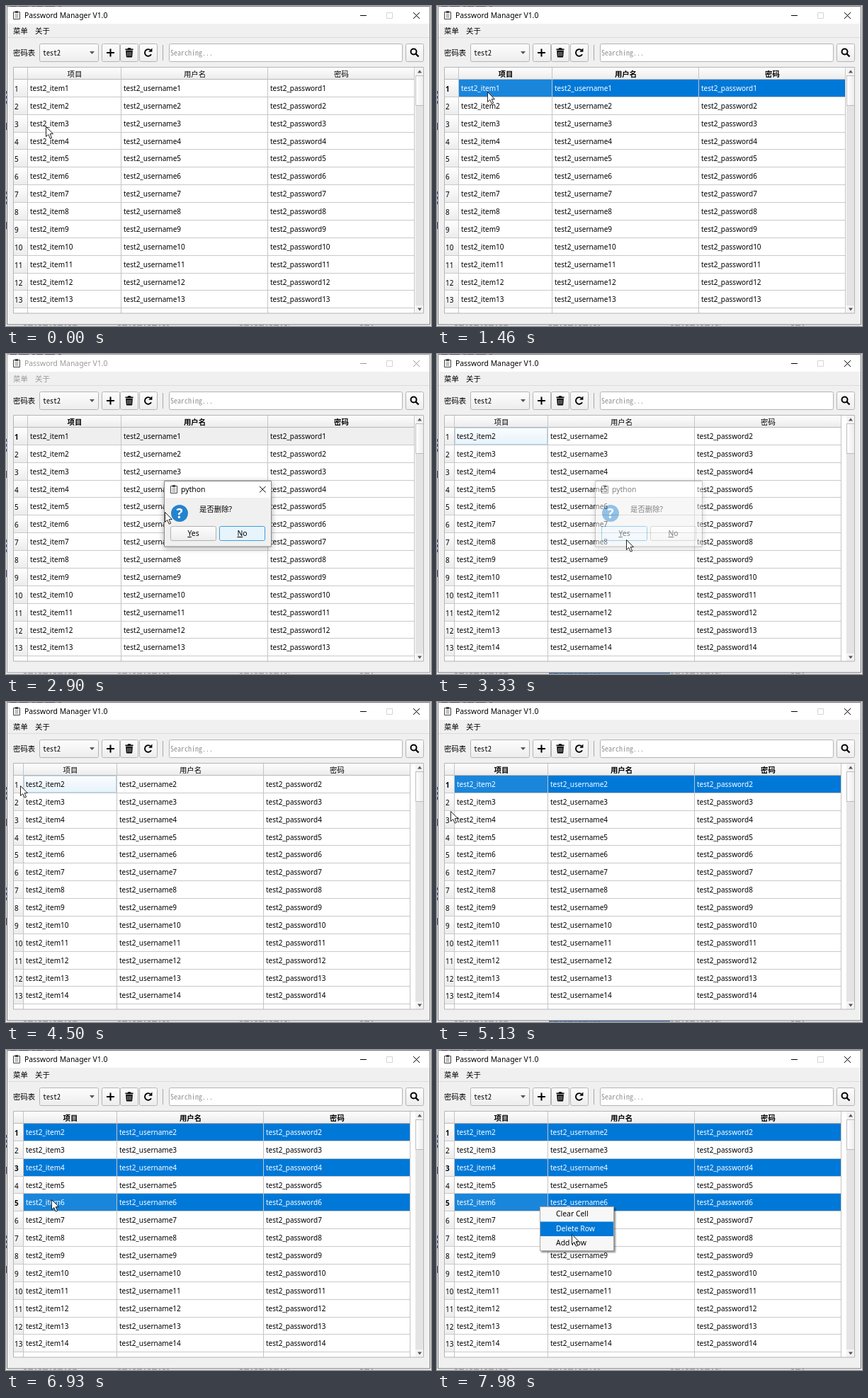
An HTML page that plays this animation: 600 px wide and 452 px high, repeating every 8000 ms.

```html
<!DOCTYPE html>
<html lang="zh">
<head>
<meta charset="utf-8">
<title>Password Manager V1.0</title>
<style>
html, body { margin: 0; width: 100%; height: 100%; overflow: hidden; background: #f0f0f0; }
svg { display: block; width: 600px; height: 452px; }
text { font: 10px "Noto Sans", "Noto Sans CJK SC", "Noto Sans CJK", sans-serif; white-space: pre; }
.ui { font-size: 10.4px; }
.mono { font: 10px "Noto Sans Mono CJK SC", "Noto Sans Mono CJK JP", monospace; }
.mid { text-anchor: middle; }
.bold { font-weight: 700; }
</style>
</head>
<body>
<svg viewBox="0 0 600 452">
  <defs>
    <linearGradient id="btn" x2="0" y2="1"><stop stop-color="#fdfdfd"/><stop offset="1" stop-color="#ededed"/></linearGradient>
    <linearGradient id="head" x2="0" y2="1"><stop stop-color="#fff"/><stop offset="1" stop-color="#ececec"/></linearGradient>
    <linearGradient id="focus" x2="0" y2="1"><stop stop-color="#fbfdff"/><stop offset="1" stop-color="#e6f3fb"/></linearGradient>
    <linearGradient id="thumb" x2="1" y2="0"><stop stop-color="#fff"/><stop offset="1" stop-color="#ececec"/></linearGradient>
    <clipPath id="view"><rect x="10" y="86" width="568" height="348"/></clipPath>
    <filter id="shade" x="-10%" y="-10%" width="125%" height="130%"><feDropShadow dx="2" dy="2" stdDeviation="1.2" flood-opacity=".45"/></filter>
    <filter id="soft" x="-15%" y="-15%" width="130%" height="140%"><feDropShadow dx="0" dy="2" stdDeviation="4" flood-opacity=".35"/></filter>
  </defs>
  <g id="window"></g>
  <g id="dialog"></g>
  <path id="cursor" d="M.5 .5V14.5L3.8 11.5L6.3 17.2L8.6 16.2L6.2 10.6H10.4Z" fill="#fff" stroke="#222" stroke-width="1"/>
</svg>
<script>
const LOOP = 8000, ROW = 24.87, BLUE = '#0078d7';
const $ = id => document.getElementById(id);

const rect = (x, y, w, h, fill, more = '') =>
  `<rect x="${x}" y="${y}" width="${w}" height="${h}" fill="${fill}" ${more}/>`;
const text = (x, y, str, cls = '', fill = '#000') =>
  `<text x="${x}" y="${y}" class="${cls}" fill="${fill}">${str}</text>`;
const line = (d, color = '#000', w = 1, more = '') =>
  `<path d="${d}" fill="none" stroke="${color}" stroke-width="${w}" ${more}/>`;
const shape = (d, fill = '#000') => `<path d="${d}" fill="${fill}"/>`;
const box = (x, y, w, h, fill, edge = '#b4b4b4') =>
  rect(x + .5, y + .5, w - 1, h - 1, fill, `stroke="${edge}" rx="2"`);
const times = (n, fn) => Array.from({ length: n }, (_, i) => fn(i)).join('');

const clipboard = (x, y) =>
  line(`M${x + .5} ${y + 1.5}h9v10h-9z`, '#444') +
  rect(x + 3, y, 4, 3, '#444') +
  line(`M${x + 2.5} ${y + 5}h5M${x + 2.5} ${y + 7}h5M${x + 2.5} ${y + 9}h5`, '#777', .9);

// Slivers of the desktop that show round the window
function desktop(s) {
  const dashes = [[25, 75], [158, 72], [330, 70], [500, 20]];
  return rect(0, 0, 600, 452, '#f4f4f4') +
    [120, 262].map(y => line(`M.5 ${y}v20`, '#3c5aa8', 1, 'stroke-dasharray="4 3"')).join('') +
    [165, 305].map(y => rect(0, y, 1, 10, '#6a4a86')).join('') +
    dashes.map(([x, w]) => line(`M${x} 451h${w}`, '#8a8a8a', 1, 'stroke-dasharray="4 2 7 3 2 3"')).join('') +
    (s.strip ? rect(158, 449.5, 171, 2, '#1c4f91') : '');
}

function frame(s) {
  const ink = s.inactive ? '#999' : '#000';
  return rect(1, 1, 598, 449, '#f0f0f0') + rect(1, 1, 598, 24, '#fff') +
    line('M1.5 .5H598.5V450H1.5Z', s.inactive ? '#9a9a9a' : '#777') +
    line('M6 .5H80', '#4a4058', 1, 'stroke-dasharray="9 3 14 5 4 2"') +
    clipboard(10, 7) +
    text(26, 17, 'Password Manager V1.0', 'ui', ink) +
    line('M500 13.5h9', ink) + line('M537.5 9.5h8v8h-8z', '#d4d4d4') +
    line('M575 9l9 9M584 9l-9 9', ink) +
    text(10, 38.5, '菜单', 'ui', ink) + text(41, 38.5, '关于', 'ui', ink) +
    line('M2 44.5H598', '#dcdcdc');
}

const toolbar = () =>
  text(10, 70, '密码表', 'ui') +
  box(47, 53, 84, 26, 'url(#btn)') + text(52, 70, 'test2', 'mono') +
  shape('M118 64h7l-3.5 4z', '#555') +
  [135, 161, 188, 564].map(x => box(x, 53, 26, 26, 'url(#btn)')).join('') +
  line('M147.5 60.5v11M142 66h11', '#000', 2) +
  shape('M168.5 60.5h3l.8-1.3h3.4l.8 1.3h3v1.8h-11zM169.2 63h9.6l-.6 8.6q-.1 1-1 1h-6.4q-.9 0-1-1z') +
  line('M171.8 64.5v6.4M174 64.5v6.4M176.2 64.5v6.4', '#ddd', .8) +
  line('M204.2 62.6A4.8 4.8 0 1 0 205 68.2', '#000', 1.9) + shape('M206.4 59.6v5.2h-5.2z') +
  line('M221.5 55v22', '#a8a8a8') +
  box(230, 53, 330, 26, '#fff') + text(232, 70, 'Searching...', 'mono', '#8f8f8f') +
  `<circle cx="575.5" cy="64.5" r="4" fill="none" stroke="#000" stroke-width="2"/>` +
  line('M578.5 67.5l4 4', '#000', 2.4);

const rowTop = i => Math.round(104 + ROW * i);

function row(i, s, cols) {
  const y = rowTop(i), h = rowTop(i + 1) - y - 1, n = i + 1, id = i + s.first;
  const on = s.sel.includes(n), cur = s.cur === n;
  const blue = on && !s.inactive;
  const [a, b, c, end] = cols;
  let out = rect(10, y, a - 11, h, 'url(#head)') + text(12, y + 17, n, on ? 'bold' : '');
  if (on) out += rect(a, y, end - a, h, blue ? BLUE : '#efefef');
  if (cur && blue) out += rect(a, y, b - a - 1, h, '#fff', 'fill-opacity=".1"');
  if (cur && !on) out += rect(a + .5, y + .5, b - a - 2, h - 1, 'url(#focus)', 'stroke="#b5d6ea"');
  const ink = blue ? '#fff' : '#000';
  return out + text(a + 3, y + 16, 'test2_item' + id, '', ink) +
    text(b + 3, y + 16, 'test2_username' + id, '', ink) +
    text(c + 3, y + 16, 'test2_password' + id, '', ink) +
    rect(10, y + h, end - 10, 1, '#c9c9c9');
}

function table(s) {
  const x = s.first > 1 ? 25 : 31, cols = [x, x + 132, x + 339, x + 546];
  const cls = 'ui mid' + (s.sel.length ? ' bold' : '');
  const titles = ['项目', '用户名', '密码'];
  return rect(10, 86, 580, 348, '#fff') + '<g clip-path="url(#view)">' +
    rect(10, 86, cols[3] - 10, 17, 'url(#head)') + rect(10, 103, cols[3] - 10, 1, '#b8b8b8') +
    titles.map((t, i) => text((cols[i] + cols[i + 1]) / 2, 99.5, t, cls)).join('') +
    times(14, i => row(i, s, cols)) +
    cols.map(c => rect(c - 1, 86, 1, 348, '#c4c4c4')).join('') + '</g>' +
    rect(578, 87, 12, 347, '#e4e4e4') +
    rect(578, 87, 12, 11, '#f3f3f3') + rect(578, 423, 12, 11, '#f3f3f3') +
    rect(578.5, 98.5, 11, 42, 'url(#thumb)', 'stroke="#bdbdbd"') +
    shape('M581 94.5h6l-3-4z', '#555') + shape('M581 426.5h6l-3 4z', '#555') +
    line('M10.5 86.5h579v347.5h-579z', '#b4b4b4');
}

function contextMenu({ at: [x, y], hot }) {
  const items = ['Clear Cell', 'Delete Row', 'Add Row'];
  return rect(x, y, 105, 63, '#f7f7f7', 'filter="url(#shade)"') +
    rect(x + .5, y + .5, 104, 62, '#f7f7f7', 'stroke="#a6a6a6"') +
    items.map((t, i) => (i === hot ? rect(x + 1, y + 1 + i * 20.5, 103, 20.5, BLUE) : '') +
      text(x + 23, y + 14 + i * 20.7, t, 'ui', i === hot ? '#fff' : '#000')).join('');
}

function question(yes) {
  const button = (x, on, key, rest) =>
    box(x, 243, 65, 21, on ? '#e8f4fb' : 'url(#btn)', on ? '#3aa0dc' : '#b0b0b0') +
    text(x + 32.5, 257, `<tspan text-decoration="underline">${key}</tspan>${rest}`, 'ui mid');
  return rect(223, 179, 152, 93, '#f0f0f0', 'filter="url(#soft)"') +
    rect(223, 179, 152, 24, '#fff') + line('M223.5 179.5h151v92.5h-151z', '#888') +
    clipboard(232, 185) + text(247, 195, 'python', 'ui') +
    (yes ? '' : line('M358 187l8.5 8.5M366.5 187l-8.5 8.5')) +
    '<circle cx="245" cy="225" r="12" fill="#2583cd"/>' +
    `<text x="245" y="232" class="mid" fill="#fff" style="font-size:19px;font-weight:700">?</text>` +
    text(273, 223, '是否删除?', 'ui') +
    button(232, yes, 'Y', 'es') + button(301, !yes, 'N', 'o');
}

// Each step changes part of the state from its time on
const steps = [
  [0, { first: 1, sel: [], cur: 0, menu: null, inactive: false, strip: false, yes: false }],
  [790, { sel: [1], cur: 1 }],
  [1740, { menu: { at: [96, 114], hot: -1 } }],
  [1960, { menu: { at: [96, 114], hot: 1 } }],
  [2310, { menu: null }],
  [2350, { inactive: true }],
  [3050, { yes: true }],
  [3270, { first: 2, sel: [], cur: 1, inactive: false, strip: true }],
  [4000, { strip: false }],
  [4720, { sel: [1], strip: true }],
  [5400, { sel: [1, 3], cur: 3 }],
  [6370, { sel: [1, 3, 5], cur: 5, strip: false }],
  [7480, { menu: { at: [145, 221], hot: -1 } }],
  [7720, { menu: { at: [145, 221], hot: 1 } }],
];

// time, x, y
const track = [
  [0, 56, 170], [70, 56, 169], [500, 16, 122], [700, 14, 118], [910, 20, 116], [980, 20, 115],
  [1250, 20, 115], [1460, 71, 121], [1680, 96, 114], [1820, 96, 114], [2040, 131, 144],
  [2560, 131, 144], [3050, 265, 258], [3300, 267, 262], [3440, 267, 262], [3670, 262, 256],
  [4230, 20, 118], [4820, 20, 118], [5230, 19, 165], [5480, 19, 165], [5750, 30, 188],
  [6100, 22, 212], [6440, 22, 212], [7140, 82, 211], [7400, 145, 221], [7560, 145, 221],
  [7850, 190, 260], [8000, 190, 260],
];

const ramp = (t, a, b) => Math.min(1, Math.max(0, (t - a) / (b - a)));

function place(t) {
  const i = track.findIndex(p => p[0] > t);
  const [t0, x0, y0] = track[i - 1], [t1, x1, y1] = track[i];
  const k = ramp(t, t0, t1);
  return [x0 + (x1 - x0) * k, y0 + (y1 - y0) * k].map(Math.round);
}

let shown = -1;
function draw(t) {
  const done = steps.filter(s => s[0] <= t);
  if (done.length !== shown) {
    shown = done.length;
    const s = Object.assign({}, ...done.map(d => d[1]));
    $('window').innerHTML = desktop(s) + frame(s) + toolbar() + table(s) + (s.menu ? contextMenu(s.menu) : '');
    $('dialog').innerHTML = question(s.yes);
  }
  $('dialog').setAttribute('opacity', ramp(t, 2380, 2475) * (1 - ramp(t, 3285, 3375)));
  $('cursor').setAttribute('transform', `translate(${place(t)})`);
}

const began = performance.now();
function tick() {
  draw(Math.max(0, performance.now() - began) % LOOP);
  requestAnimationFrame(tick);
}
tick();
</script>
</body>
</html>
```
